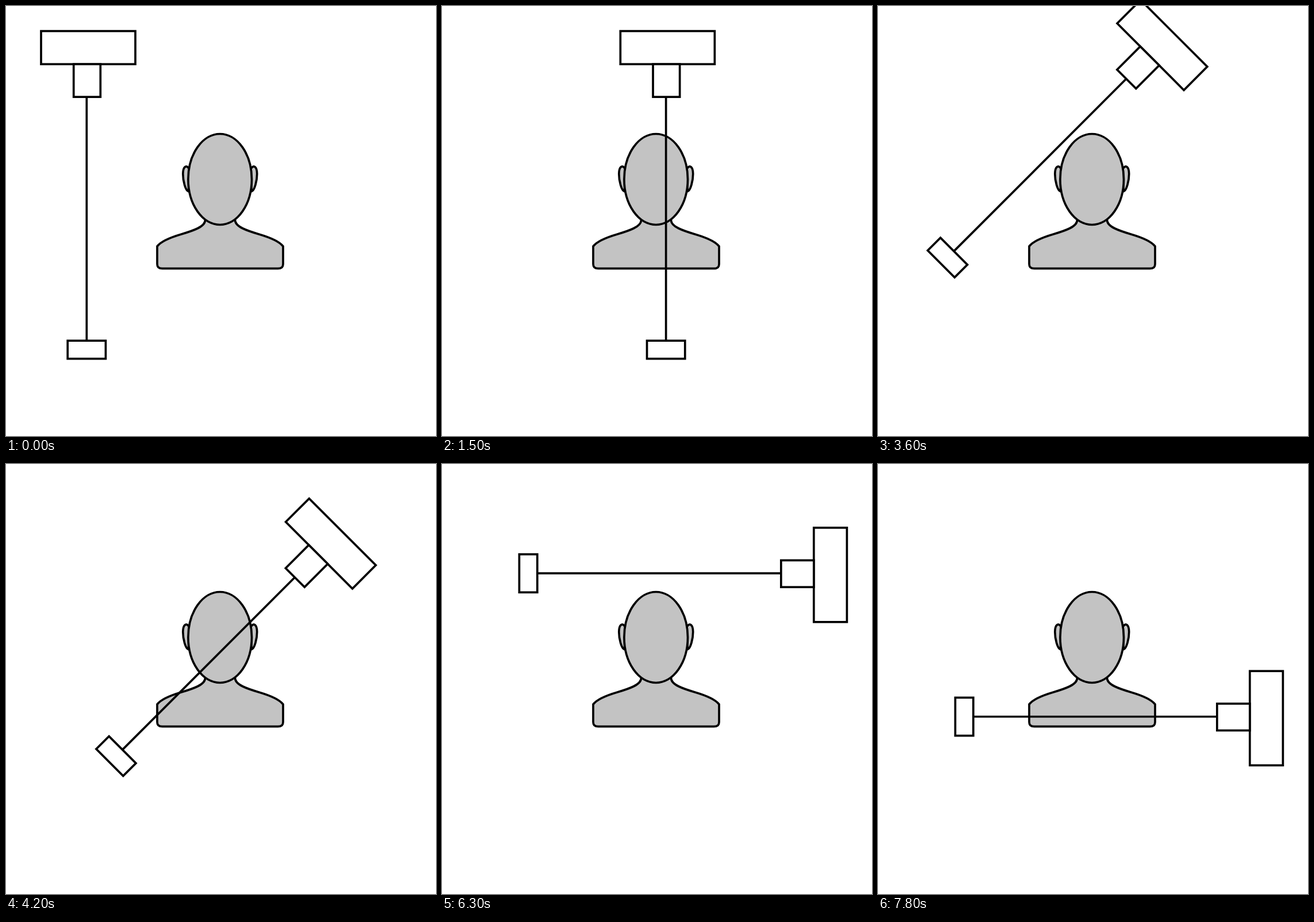
Animation, 748 px wide and 748 px high, one loop 8 s. Source, as an HTML page:

```html
<!DOCTYPE html>
<html lang="en">
<head>
<meta charset="utf-8">
<title>Scanner sweep</title>
<style>
  html, body { margin: 0; width: 100%; height: 100%; overflow: hidden; background: #fff; }
  svg { display: block; width: 100%; height: 100%; }
</style>
</head>
<body>
<svg viewBox="0 0 748 748" stroke="#000" stroke-width="3.7">
  <defs>
    <path id="ear" d="M318.5 283C314 276.500 308 278 307.800 292C307.800 304 312 321 317.500 322.500Z"/>
  </defs>
  <g fill="#c3c3c3" stroke-linejoin="round">
    <use href="#ear"/>
    <use href="#ear" transform="matrix(-1 0 0 1 744.5 0)"/>
    <path d="M346.500 372C347 384 325 391 305 397C288 402 270 409 263 418V449Q263 456.700 272 456.700
             H473Q482 456.700 482 449V418C475 409 457 402 440 397C420 391 398 384 398.500 372Z"/>
    <ellipse cx="372.2" cy="301.5" rx="55.3" ry="79"/>
  </g>
  <g id="scanner" fill="#fff">
    <path d="M140.300 158V582"/>
    <rect x="61" y="43.6" width="164" height="57.600"/>
    <rect x="117.7" y="101.2" width="46.600" height="57"/>
    <rect x="107.2" y="582.2" width="66.200" height="31.400"/>
  </g>
</svg>
<script>
  const LOOP = 8000, HOLD = 300;
  const STEPS_PER_SWEEP = 10, SHIFT = 748 / 15, TURN = 45;
  const scanner = document.getElementById('scanner');

  // Each sweep shifts the scanner sideways; the whole rig then turns about the centre.
  function draw(time) {
    const step = Math.floor((time % LOOP) / HOLD);
    const angle = Math.floor(step / STEPS_PER_SWEEP) * TURN;
    const shift = (step % STEPS_PER_SWEEP) * SHIFT;
    scanner.setAttribute('transform', `rotate(${angle} 374 374) translate(${shift} 0)`);
  }

  const start = performance.now();
  function tick() {
    draw(performance.now() - start);
    requestAnimationFrame(tick);
  }
  tick();
</script>
</body>
</html>
```
